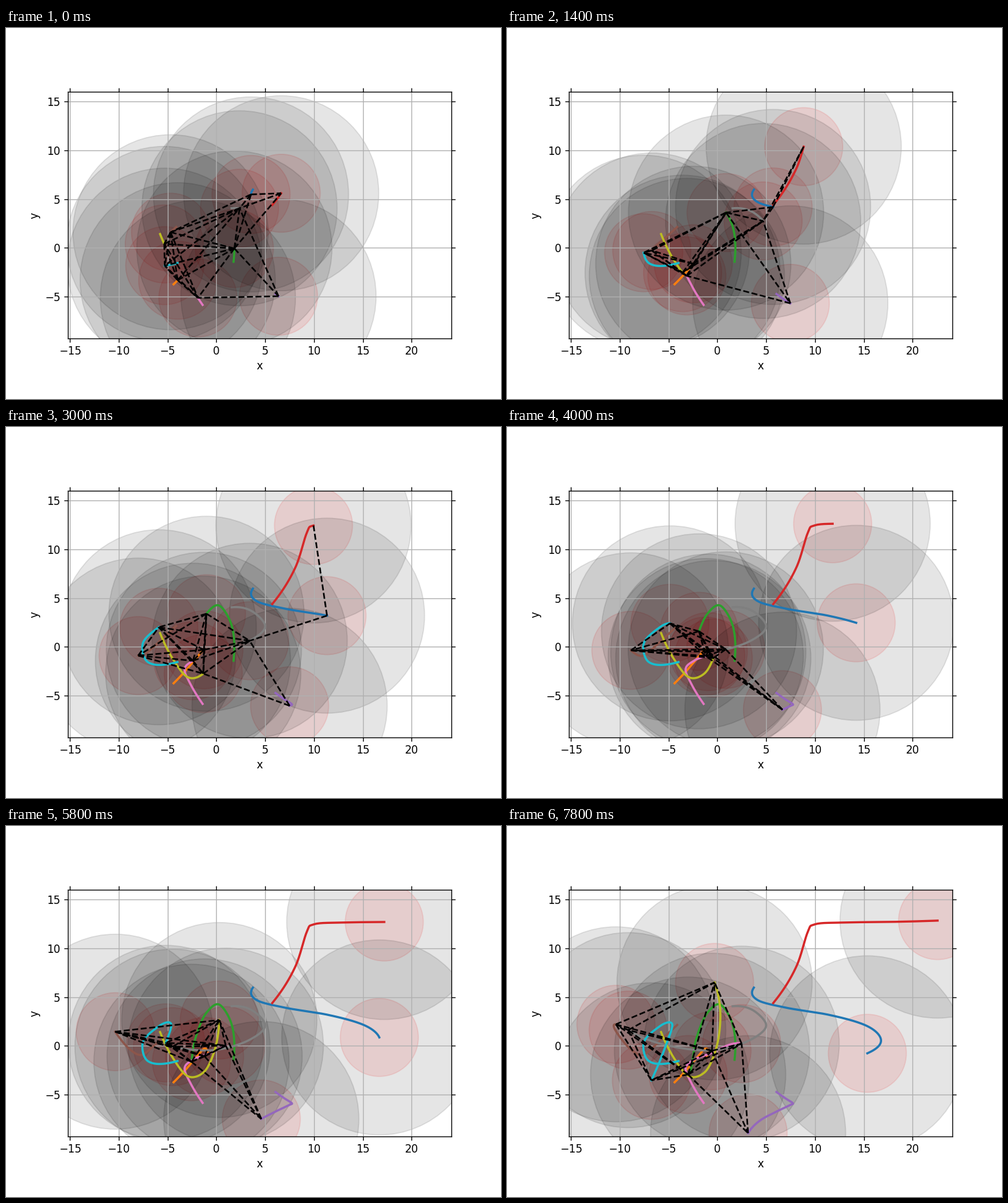
Write a matplotlib script that moves like this. It is 768 px wide and 576 px high and loops after 8000 ms.

```python
import numpy as np
import matplotlib.pyplot as plt
from matplotlib.animation import FuncAnimation
from matplotlib.collections import LineCollection

FRAMES, INTERVAL = 40, 200
LEAD = 2                 # steps already travelled when the loop starts
FINE = 8                 # trail samples per step
REACH, CORE = 10, 4      # radii of the grey and red discs
HOLD = 11.5              # a link made within REACH lasts up to here
SCALE, X0, Y0 = 15.14, 326.4, 341.4   # pixels per unit, pixel of (0, 0)
KNOTS = np.array([-LEAD, 4, 9, 15, 22, 30, FRAMES - 1], float)


def path(*points):
    """Smooth track through one pixel point per knot, in data units."""
    s = np.linspace(KNOTS[0], KNOTS[-1], int(KNOTS[-1] - KNOTS[0]) * FINE + 1)
    k = np.clip(np.searchsorted(KNOTS, s, side="right") - 1, 0, len(KNOTS) - 2)
    h = KNOTS[k + 1] - KNOTS[k]
    u = (s - KNOTS[k]) / h

    def hermite(v):
        m = np.gradient(v, KNOTS, edge_order=2)
        return ((1 + 2 * u) * (1 - u) ** 2 * v[k] + u * (1 - u) ** 2 * h * m[k]
                + u ** 2 * (3 - 2 * u) * v[k + 1] + u ** 2 * (u - 1) * h * m[k + 1])

    x, y = np.array(points, float).T
    return np.column_stack([(hermite(x) - X0) / SCALE, (Y0 - hermite(y)) / SCALE])


blue = path((383, 251), (390, 271), (432, 282), (498, 293), (555, 309), (580, 331), (559, 353))
orange = path((260, 398), (279, 378), (295, 359), (307, 346), (313, 351), (308, 358), (318, 349))
green = path((353, 363), (350, 308), (332, 278), (311, 290), (294, 329), (287, 370), (281, 386))
red = path((413, 275), (449, 218), (466, 166), (477, 153), (520, 150), (596, 149), (668, 147))
purple = path((418, 413), (432, 423), (443, 430), (440, 433), (421, 442), (393, 457), (374, 477))
brown = path((264, 309), (238, 333), (217, 352), (205, 355), (187, 342), (168, 317), (169, 308))
pink = path((305, 430), (286, 399), (277, 377), (290, 363), (316, 353), (344, 340), (364, 338))
gray = path((350, 280), (383, 287), (402, 309), (378, 332), (322, 348), (250, 341), (188, 317))
olive = path((239, 320), (260, 362), (281, 388), (306, 383), (324, 347), (331, 295), (322, 243))
cyan = path((266, 365), (220, 365), (212, 337), (237, 311), (256, 307), (246, 342), (224, 395))
tracks = np.array([blue, orange, green, red, purple, brown, pink, gray, olive, cyan])

COUNT = len(tracks)
LEAVERS = [0, 3]         # blue and red lose a link as soon as it is out of reach


def link_states():
    """For every step, which pairs are linked."""
    hold = np.full((COUNT, COUNT), HOLD)
    hold[LEAVERS, :] = hold[:, LEAVERS] = REACH
    linked = np.zeros((COUNT, COUNT), bool)
    states = []
    for pos in tracks.swapaxes(0, 1)[::FINE]:
        gap = np.linalg.norm(pos[:, None] - pos[None], axis=2)
        linked = (gap < REACH) | (linked & (gap < hold))
        states.append(np.triu(linked, 1))
    return states[LEAD:]


states = link_states()

plt.rcParams.update({"font.family": "DejaVu Sans", "xtick.top": True,
                     "ytick.right": True, "xtick.major.pad": 3})
fig, ax = plt.subplots(figsize=(6.4, 4.8), dpi=120)
ax.set_aspect("equal")
ax.set_xlim(-15.22, 24.09)
ax.set_ylim(-9.31, 15.97)
ax.set_xticks(range(-15, 21, 5))
ax.set_yticks(range(-5, 16, 5))
ax.set_xlabel("x", labelpad=3)
ax.set_ylabel("y")
ax.grid(True)


def discs(radius, color):
    return [ax.add_patch(plt.Circle((0, 0), radius, color=color, alpha=0.1))
            for _ in range(COUNT)]


cores = discs(CORE, "red")
reaches = discs(REACH, "black")
trails = [ax.plot([], [], color=f"C{i}", lw=2)[0] for i in range(COUNT)]
links = ax.add_collection(
    LineCollection([], colors="black", linewidths=1.5, linestyles="--", zorder=3),
    autolim=False)


def draw(n):
    end = (n + LEAD) * FINE
    pos = tracks[:, end]
    for p, track, core, reach, trail in zip(pos, tracks, cores, reaches, trails):
        core.center = reach.center = p
        trail.set_data(*track[:end + 1].T)
    links.set_segments([(pos[i], pos[j]) for i, j in np.argwhere(states[n])])
    return [*cores, *reaches, *trails, links]


anim = FuncAnimation(fig, draw, frames=FRAMES, interval=INTERVAL, repeat=True,
                     repeat_delay=0)
plt.show()
```
